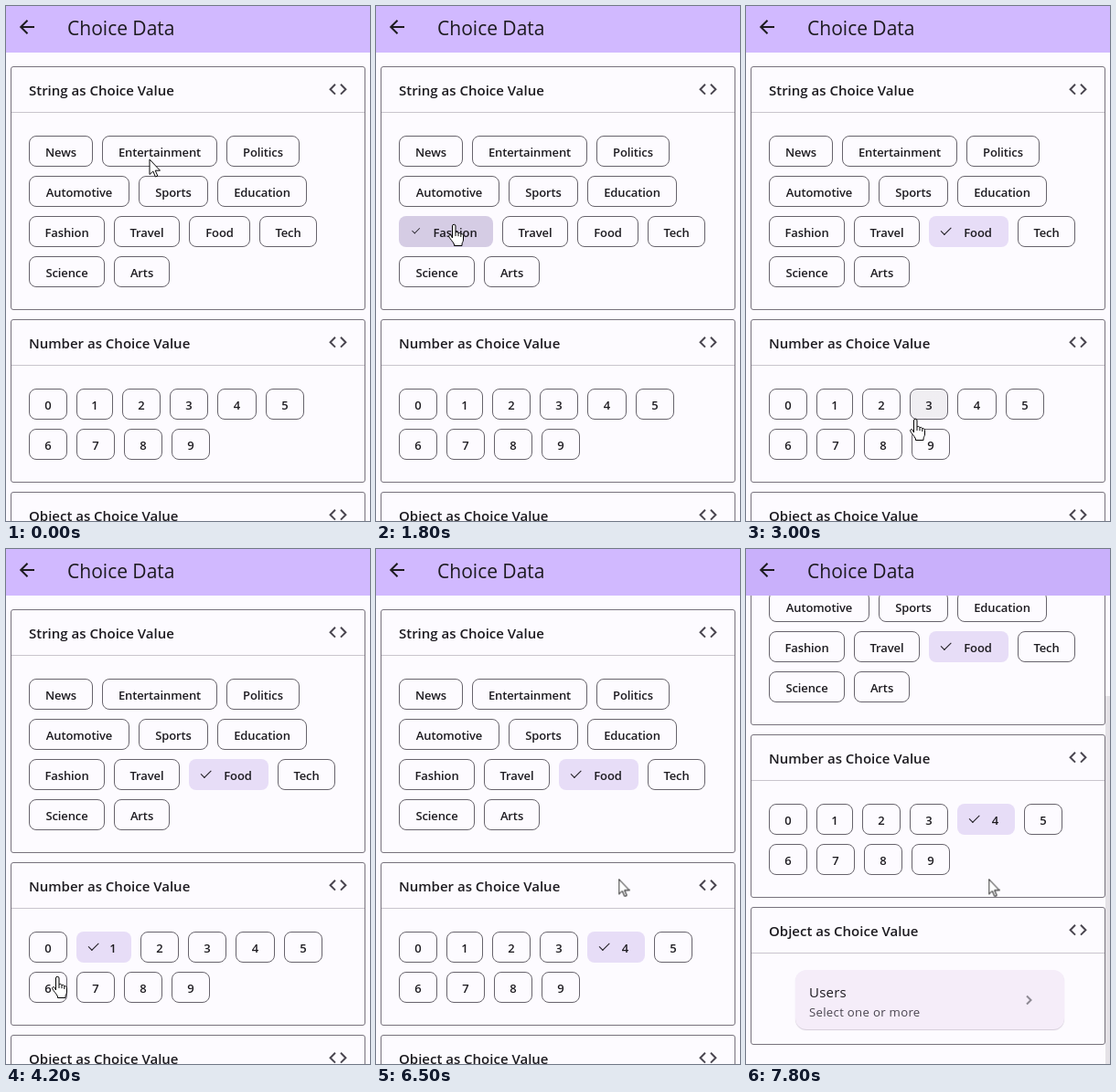
Write an HTML page that moves like this. It is 398 px wide and 564 px high and loops after 8 s.

```html
<!DOCTYPE html>
<html lang="en">
<head>
<meta charset="utf-8">
<title>Choice Data</title>
<style>
/* --t counts tenths of a second; --scroll is the page offset in px */
@property --t { syntax: '<number>'; inherits: true; initial-value: 0; }
@property --scroll { syntax: '<number>'; inherits: true; initial-value: 0; }

@keyframes clock { to { --t: 80; } }
@keyframes scroll {
  0%, 91.25% { --scroll: 0; animation-timing-function: steps(2); }
  93.75% { --scroll: 95; animation-timing-function: steps(2); }
  96.25%, 100% { --scroll: 140; }
}
@keyframes pointer {
  0%, 6.25% { transform: translate(157px, 168px); animation-timing-function: steps(3); }
  10%, 13.75% { transform: translate(64px, 164px); animation-timing-function: steps(3); }
  17.5%, 22.5% { transform: translate(85px, 240px); animation-timing-function: steps(4); }
  27.5%, 32.5% { transform: translate(236px, 248px); animation-timing-function: steps(4); }
  37.5% { transform: translate(185px, 453px); animation-timing-function: steps(4); }
  42.5%, 48.75% { transform: translate(104px, 441px); animation-timing-function: steps(3); }
  52.5% { transform: translate(56px, 469px); animation-timing-function: steps(2); }
  55%, 58.75% { transform: translate(54px, 477px); animation-timing-function: steps(4); }
  63.75%, 67.5% { transform: translate(231px, 441px); animation-timing-function: steps(2); }
  70%, 73.75% { transform: translate(250px, 440px); animation-timing-function: steps(4); }
  78.75% { transform: translate(262px, 380px); animation-timing-function: steps(2); }
  81.25%, 100% { transform: translate(265.5px, 361.5px); }
}
@keyframes hand {
  0%, 12.5%, 33.75%, 60%, 75%, 100% { opacity: 0; }
  8.75%, 16.25%, 36.25%, 70% { opacity: 1; }
}
@keyframes arrow {
  0%, 12.5%, 33.75%, 60%, 75%, 100% { opacity: 1; }
  8.75%, 16.25%, 36.25%, 70% { opacity: 0; }
}

html, body { margin: 0; width: 100%; height: 100%; overflow: hidden; }
body {
  position: relative;
  background: #fdfbff;
  color: #1d1b20;
  font: 15px 'Open Sans', 'Noto Sans', sans-serif;
  animation: clock 8s -5ms steps(80) infinite, scroll 8s -5ms infinite;
  --moved: clamp(0, (var(--t) - 73) / 3, 1);
}
svg { position: absolute; overflow: visible; fill: none; stroke: #49454f; stroke-width: 2; }

header {
  position: absolute;
  inset: 0 0 auto;
  height: 51px;
  font-size: 21px;
  line-height: 48px;
  text-indent: 67px;
  background: color-mix(in srgb, #c9b0fb calc(var(--moved) * 100%), #d1b9ff);
}
header svg { left: 11px; top: 11px; stroke: #1d1b20; }

main { position: absolute; inset: 51px 0 0; overflow: hidden; }
.page { position: absolute; inset: 0; transform: translateY(calc(var(--scroll) * -1px)); }
.thumb {
  position: absolute;
  left: 393px;
  width: 5px;
  height: 403px;
  background: #e4e1e6;
  opacity: var(--moved);
  transform: translateY(calc(var(--scroll) * .786px));
}

section {
  position: absolute;
  left: 5px;
  top: var(--y);
  width: 388px;
  height: var(--h);
  box-sizing: border-box;
  border: 1px solid #77727c;
  border-radius: 3px;
}
h2 {
  margin: 0;
  height: 49px;
  padding-left: 19px;
  border-bottom: 1px solid #c9c5cd;
  font-size: 15px;
  font-weight: 600;
  line-height: 50px;
}
h2 svg { left: 345px; top: 12px; }

.row { display: flex; gap: 10px; margin: 0 0 10px 19px; }
h2 + .row { margin-top: 25px; }
.chip {
  --on: 99; --off: 99; --enter: 99; --leave: 99; --shade: .08;
  --sel: calc(clamp(0, (var(--t) - var(--on)) / 2, 1) - clamp(0, (var(--t) - var(--off)) / 2, 1));
  --hover: calc(clamp(0, var(--t) - var(--enter) + 1, 1) - clamp(0, var(--t) - var(--leave) + 1, 1));
  --tint: rgb(0 0 0 / calc(var(--hover) * var(--shade)));
  position: relative;
  flex: none;
  box-sizing: border-box;
  width: calc((var(--w) + 20 * var(--sel)) * 1px);
  height: 34px;
  padding-left: calc(var(--sel) * 20px);
  border: 1px solid rgb(103 99 108 / calc(1 - var(--sel)));
  border-radius: 8px;
  background: linear-gradient(var(--tint), var(--tint)) rgb(231 221 247 / var(--sel));
  font-size: 13px;
  font-weight: 600;
  letter-spacing: -.1px;
  line-height: 34px;
  text-align: center;
  white-space: nowrap;
}
.chip::before {
  content: '';
  position: absolute;
  left: 12px;
  top: 11px;
  width: 10px;
  height: 4.5px;
  border: solid #1d1b20;
  border-width: 0 0 1.6px 1.6px;
  opacity: var(--sel);
  transform: scale(clamp(0, (var(--t) - var(--on) + 1) / 4, 1)) rotate(-45deg);
}

.tile {
  position: absolute;
  left: 48px;
  top: 68px;
  width: 294px;
  height: 65px;
  border-radius: 12px;
  background: #f5edf9;
  box-shadow: 0 1px 1px #d5cdda;
}
.tile span { position: absolute; left: 15px; letter-spacing: .25px; line-height: 20px; }
.tile span + span { top: 36px; color: #49454f; font-size: 13.2px; letter-spacing: .3px; }
.tile svg { left: 252px; top: 28px; stroke: #8d8993; }

.pointer { position: absolute; left: 0; top: 0; animation: pointer 8s -5ms infinite; }
.pointer svg { left: 0; top: 0; fill: #fff; stroke: #000; stroke-width: 1; stroke-linejoin: round; }
.arrow { animation: arrow 8s -5ms step-end infinite; }
.hand { animation: hand 8s -5ms step-end infinite; }
</style>
</head>
<body>
<main>
  <div class="page">
    <section style="--y:15px;--h:267px">
      <h2>String as Choice Value</h2>
      <div class="row">
        <div class="chip" style="--w:70;--on:9;--off:15.5;--enter:8;--leave:12">News</div>
        <div class="chip" style="--w:126">Entertainment</div>
        <div class="chip" style="--w:80">Politics</div>
      </div>
      <div class="row">
        <div class="chip" style="--w:110">Automotive</div>
        <div class="chip" style="--w:76">Sports</div>
        <div class="chip" style="--w:98">Education</div>
      </div>
      <div class="row">
        <div class="chip" style="--w:83;--on:16;--off:24;--enter:14;--leave:20">Fashion</div>
        <div class="chip" style="--w:72">Travel</div>
        <div class="chip" style="--w:67;--on:24;--enter:21;--leave:27">Food</div>
        <div class="chip" style="--w:63">Tech</div>
      </div>
      <div class="row">
        <div class="chip" style="--w:83">Science</div>
        <div class="chip" style="--w:61">Arts</div>
      </div>
    </section>

    <section style="--y:292px;--h:179px">
      <h2>Number as Choice Value</h2>
      <div class="row">
        <div class="chip" style="--w:42">0</div>
        <div class="chip" style="--w:40;--on:35;--off:46;--enter:34;--leave:41">1</div>
        <div class="chip" style="--w:42">2</div>
        <div class="chip" style="--w:42;--enter:30;--leave:32;--shade:.05">3</div>
        <div class="chip" style="--w:43;--on:57;--enter:56;--leave:61">4</div>
        <div class="chip" style="--w:42">5</div>
      </div>
      <div class="row">
        <div class="chip" style="--w:42;--on:46;--off:57;--enter:46;--leave:49">6</div>
        <div class="chip" style="--w:42">7</div>
        <div class="chip" style="--w:42">8</div>
        <div class="chip" style="--w:42">9</div>
      </div>
    </section>

    <section style="--y:481px;--h:151px">
      <h2>Object as Choice Value</h2>
      <div class="tile">
        <span style="top:14px">Users</span><span>Select one or more</span>
        <svg width="8" height="10"><path d="M1 0.5 5.5 5 1 9.5"/></svg>
      </div>
    </section>
  </div>
  <div class="thumb"></div>
</main>

<header>
  <svg width="24" height="24"><path d="M20 12H5.5M12.5 4.7 5.2 12l7.3 7.3"/></svg>
  Choice Data
</header>

<div class="pointer">
  <svg class="arrow" width="12" height="19"><path d="M0 0V16.5L3.8 13 6.4 19 8.8 18 6.2 12.2H11.5Z"/></svg>
  <svg class="hand" width="17" height="24"><path transform="translate(-6 -1)" d="M4.5 15V2a1.75 1.75 0 0 1 3.5 0v7c1-1 2.6-.7 3 .8 1-.8 2.4-.4 2.8 1 1.2-.5 2.7.1 2.7 1.8V17c0 2-1.5 3.2-1.5 5v1.5H6.5V22C5 19 2 16 .8 13.8c-.8-1.8 1.2-2.9 2.4-1.5zM8 9v4M11 10v3.2M13.8 11v3"/></svg>
</div>

<script>
const codeIcon = '<svg width="24" height="24"><path d="M9 6.8 3.6 12.2 9 17.6M15 6.8l5.4 5.4L15 17.6"/></svg>';
for (const title of document.querySelectorAll('h2')) title.insertAdjacentHTML('beforeend', codeIcon);
</script>
</body>
</html>
```
